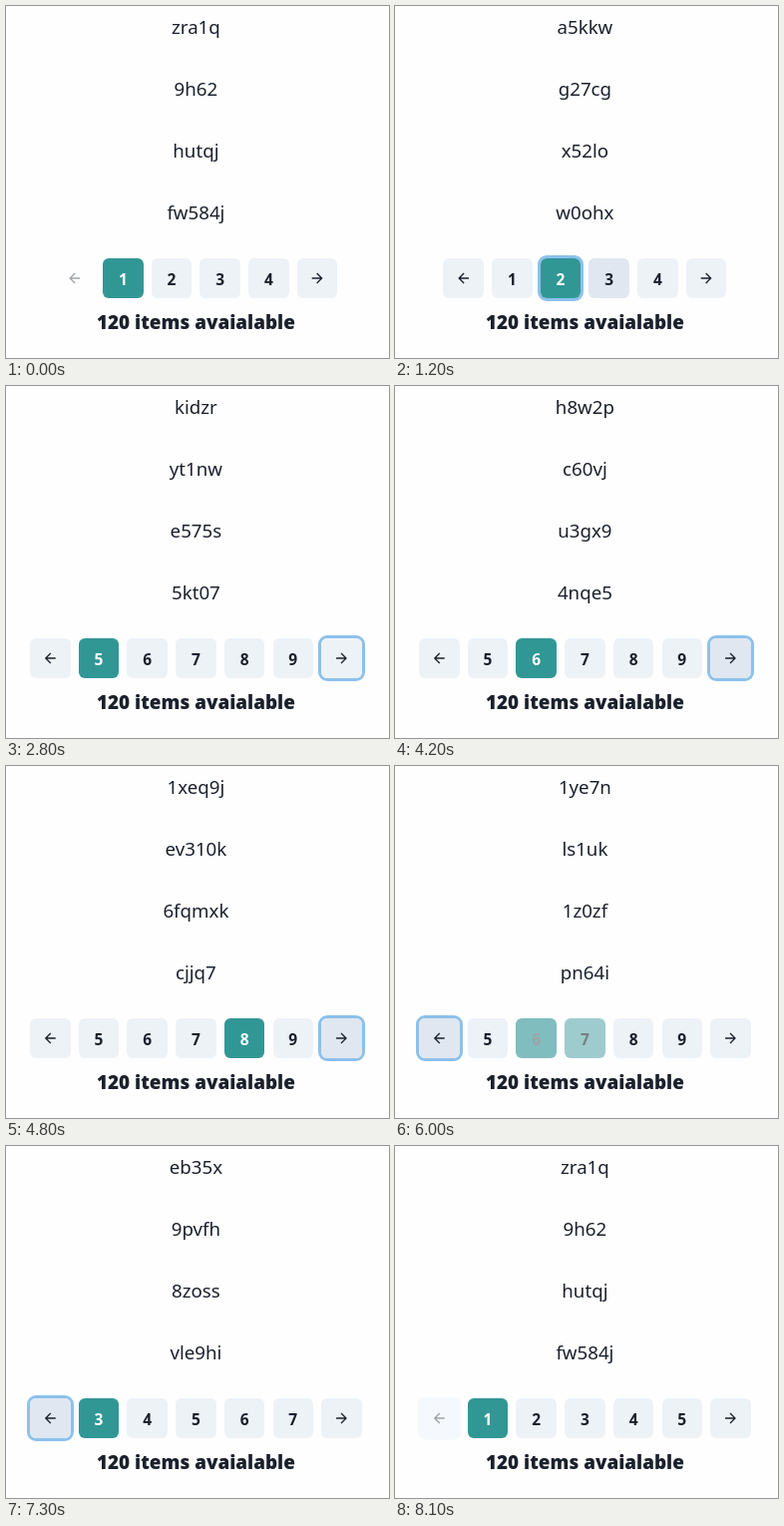
Recreate the animation shown at these times as an HTML page. Size 384x353 px, loop 9700 ms.

```html
<!DOCTYPE html>
<html lang="en">
<meta charset="utf-8">
<title>Pagination</title>
<style>
  html, body { margin: 0; width: 100%; height: 100%; overflow: hidden; background: #fefefe; }
  svg { display: block; }
  text { text-anchor: middle; }
  .item { font: 400 18.7px "Noto Sans", "Open Sans", sans-serif; }
  .label { font: 600 15.5px "Noto Sans", "Open Sans", sans-serif; }
  .total { font: 800 18.85px "Open Sans", "Noto Sans", sans-serif; }
</style>
<svg id="stage" width="384" height="353" viewBox="0 0 384 353"></svg>
<script>
const LOOP = 9700, FADE = 200, APPROACH = 150;
const CENTER = 190.4, PITCH = 48.7, SIZE = 40.6, TOP = 253, HEIGHT = 40;
const PAPER = '#fefefe', GRAY = '#edf2f7', HOVER = '#e0e7f0', FAINT = '#f5f9fd',
      TEAL = '#319795', RING = '#4299e1', INK = '#1a202c', WHITE = '#ffffff';
const stage = document.getElementById('stage');

const pages = [
  'zra1q 9h62 hutqj fw584j', 'a5kkw g27cg x52lo w0ohx', 'eb35x 9pvfh 8zoss vle9hi',
  'm4t8c q0znd 7ybk2 dr36u', 'kidzr yt1nw e575s 5kt07', '1ye7n ls1uk 1z0zf pn64i',
  'h8w2p c60vj u3gx9 4nqe5', '1xeq9j ev310k 6fqmxk cjjq7'
].map(p => p.split(' '));

// Slot 0 is the back arrow, the slot after the last number is the next arrow.
// The window of numbers moves only when the new page lies outside it.
function press(state, time, target) {
  let { page, first, count } = state;
  page = target === 'back' ? page - 1 : target === 'next' ? page + 1 : target;
  if (page < first || page >= first + count) [first, count] = [page, 5];
  const focus = target === 'back' ? 0 : target === 'next' ? count + 1 : page - first + 1;
  return { time, page, first, count, focus };
}

const states = [{ time: 0, page: 1, first: 1, count: 4, focus: -1 }];
const click = (time, target) => states.push(press(states.at(-1), time, target));
click(900, 2);
click(1250, 3);
click(1700, 4);
for (const time of [2300, 3300, 4200, 4600]) click(time, 'next');
for (let i = 0; i < 7; i++) click(5500 + 390 * i, 'back');

const ease = k => k * k * (3 - 2 * k);
const channel = (hex, i) => parseInt(hex.slice(1 + 2 * i, 3 + 2 * i), 16);
const mix = (a, b, k) => k <= 0 ? a : k >= 1 ? b :
  '#' + [0, 1, 2].map(i => Math.round(channel(a, i) * (1 - k) + channel(b, i) * k).toString(16).padStart(2, '0')).join('');
const text = (cls, x, y, s, color = INK) => `<text class="${cls}" x="${x}" y="${y}" fill="${color}">${s}</text>`;
const rect = (x, width, grow, paint) =>
  `<rect x="${x - grow}" y="${TOP - grow}" width="${width + 2 * grow}" height="${HEIGHT + 2 * grow}" rx="${6 + grow}" ${paint}/>`;
const arrow = (x, flip, opacity) =>
  `<path transform="translate(${x} 273) scale(${flip * 0.677} .677) translate(-12 -12)" fill="${INK}" opacity="${opacity}"
    d="M12 4l-1.41 1.41L16.17 11H4v2h12.17l-5.58 5.59L12 20l8-8z"/>`;

function button(slot, now, before, k, hover) {
  const edge = CENTER - ((now.count + 1) * PITCH + SIZE) / 2 + slot * PITCH;
  const x = Math.round(edge), width = Math.round(edge + SIZE) - x, mid = edge + SIZE / 2;
  const blend = test => test(before) * (1 - k) + test(now) * k;
  const active = blend(s => s.page - s.first + 1 === slot);
  const off = blend(s => slot === 0 && s.page === 1);
  const ring = blend(s => s.focus === slot) * (1 - off);
  const disabled = now.focus === slot ? FAINT : PAPER;
  const fill = mix(mix(slot === hover ? HOVER : GRAY, disabled, off), TEAL, active);
  let out = rect(x, width, 1.5, `fill="none" stroke="${RING}" stroke-width="3" opacity="${0.6 * ring}"`);
  if (off) out += rect(x, width, 1.5, `fill="${disabled}" opacity="${off}"`);
  out += rect(x, width, 0, `fill="${fill}"`);
  if (slot === 0) return out + arrow(mid, -1, 1 - 0.6 * off);
  if (slot > now.count) return out + arrow(mid, 1, 1);
  return out + text('label', mid, 279.8, now.first + slot - 1, mix(INK, WHITE, active));
}

function render(t) {
  const i = states.findLastIndex(s => s.time <= t);
  const now = states[i], before = states[i - 1] ?? now, next = states[i + 1];
  const k = ease(Math.min(1, (t - now.time) / FADE));
  // The pointer reaches a button shortly before pressing it; a shifted window leaves it between buttons
  const arriving = next && next.time - t < APPROACH;
  const shifted = now.count !== before.count;
  const hover = arriving ? Math.min(next.focus, now.count + 1) : shifted ? -1 : now.focus;
  let out = pages[now.page - 1].map((s, row) => text('item', CENTER, 28 + 62 * row, s)).join('');
  for (let slot = 0; slot <= now.count + 1; slot++) out += button(slot, now, before, k, hover);
  stage.innerHTML = out + text('total', CENTER, 324, '120 items avaialable');
}

const start = performance.now();
function tick() {
  render((performance.now() - start) % LOOP);
  requestAnimationFrame(tick);
}
tick();
</script>
</html>
```
